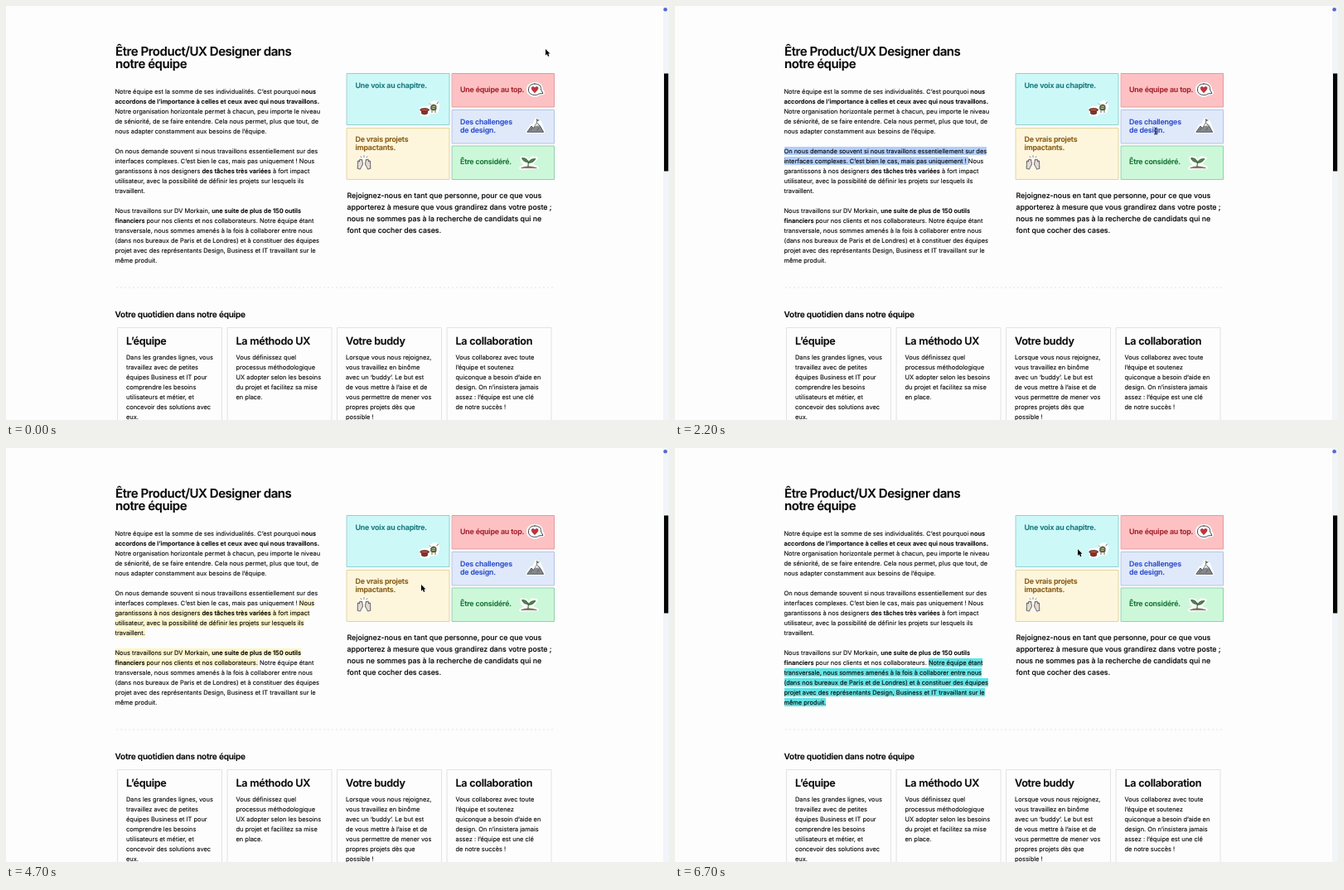
These frames come from a looping animation (800 by 500 pixels, 6800 ms). An HTML page:

```html
<!DOCTYPE html>
<html lang="fr">
<head>
<meta charset="utf-8">
<title>Notre équipe</title>
<style>
html, body { margin: 0; width: 100%; height: 100%; overflow: hidden; background: #fdfdfd; }
#stage { position: relative; width: 800px; height: 500px; overflow: hidden; background: #fdfdfd;
  font: 7.45px/12px Inter, "Liberation Sans", sans-serif; color: #080808;
  font-optical-sizing: none; text-rendering: geometricPrecision;
  -webkit-text-stroke: .12px currentColor; }
svg { position: absolute; left: 0; top: 0; }
.txt { position: absolute; white-space: pre; }
b { font-weight: 600; }
mark { color: inherit; background: none; padding: .5px 0; }
.title { font-size: 15px; line-height: 15px; font-weight: 600; letter-spacing: -.45px; }
.section { font-size: 10px; font-weight: 600; letter-spacing: -.19px; }
.head { font-size: 12.6px; line-height: 14px; font-weight: 600; letter-spacing: -.28px; }
.quote { font-size: 8.78px; line-height: 14px; font-weight: 500; }
.label { font-size: 8.85px; line-height: 10px; font-weight: 600; letter-spacing: -.17px; }
</style>
</head>
<body>
<div id="stage">
<svg width="800" height="500" fill="none" stroke-linecap="round" stroke-linejoin="round">
  <rect x="793" width="7" height="500" fill="#f1f4f8"/>
  <rect x="794" y="81.5" width="5.2" height="118" fill="#050505"/>
  <circle cx="795.6" cy="4.2" r="2.3" fill="#5468cf"/>
  <path d="M133 340H662" stroke="#e3e3e3" stroke-width="1" stroke-linecap="butt" stroke-dasharray="2 3"/>
  <g id="boxes"></g>

  <g id="pot">
    <path d="M500 123.500Q505 121 511 122.500L513 117 516 115.500 521 116 522 121 520 128 511 129.500 509 132 501.500 131.500Z" fill="#fff" stroke="#fff" stroke-width="2.500"/>
    <path d="M501.500 126V130Q505 132 508.500 130V126Z" fill="#84372d" stroke="#4a2520" stroke-width=".7"/>
    <ellipse cx="505" cy="125.500" rx="5.300" ry="1.900" fill="#ad4b3b" stroke="#4a2520" stroke-width=".8"/>
    <path d="M513 120.500Q516 117.500 519 120.500V125Q516 127 513 125Z" fill="#587554" stroke="#2c4030" stroke-width=".8"/>
    <path d="M514 126V128.500M518 126V128.500M520 118L521.500 116M512.500 119L511.500 118" stroke="#665230" stroke-width=".9"/>
    <path d="M515 121.500H517.500M514.500 123.500H517" stroke="#d9c58b" stroke-width=".8"/>
  </g>

  <g id="bubble">
    <path d="M638 94C644 94 646 97 646 101L648 105 643 106C640 109 630 108 630 101 630 96 634 94 638 94Z" fill="#fff" stroke="#fff" stroke-width="4"/>
    <path d="M638 94C644 94 646 97 645.500 101L648 105.500 643 106C640 109 630 108 630.500 101 630.500 96 634 94 638 94Z" fill="#fff" stroke="#353535" stroke-width=".9"/>
    <path d="M638 104.500C633 101 633.500 97.500 636 97.500 637.500 97.500 638 99 638 99S638.700 97.500 640.300 97.500C643 97.500 643 101 638 104.500Z" fill="#c9303d" stroke="#7b1f29" stroke-width=".5"/>
  </g>

  <g id="mountain">
    <path d="M629 152L634 144.500 637 145 640 137 644 140 648.500 152Z" fill="#fff" stroke="#fff" stroke-width="4"/>
    <path d="M629 152L634 145 636.500 147.500 640.500 141 644.500 145 648.500 152Z" fill="#85898d" stroke="#45494d" stroke-width=".9"/>
    <path d="M638 145.500L640.500 141 643.500 145.500 641 144.500Z" fill="#e9edef"/>
    <path d="M633 150L635 147.500M641 150L643 147" stroke="#555a5e" stroke-width=".9"/>
    <path d="M640.500 141V136.500" stroke="#444" stroke-width=".7"/>
    <path d="M640.700 136.500L644 138 640.700 139.500Z" fill="#58825d"/>
  </g>

  <g id="hands">
    <path d="M424 188L430 185 430 195 426 197ZM440 188L434 185 434 195 438 197ZM428 182L432 181 436 182" fill="#fff" stroke="#fff" stroke-width="3"/>
    <path id="hand" transform="rotate(14 427 191)" d="M425.500 196.500L424.500 192 423.500 188Q424.500 186.500 425.500 188.500L425.500 185.500Q426.500 184.500 427.200 186L427.500 185Q429 184.500 429 187L430 189Q431 191 429.500 194L429 196.500Z" fill="#e2dad4" stroke="#4d4844" stroke-width=".8"/>
    <use href="#hand" transform="matrix(-1 0 0 1 864 0)"/>
    <path d="M429 183L428 181.500M432 182.500V180.500M435 183L436 181.500" stroke="#6b6257" stroke-width=".8"/>
  </g>

  <g id="sprout">
    <path d="M622 183L628 184 630 188 635 183 640 184 636 189 632 191 641 195 621 196 628 191 623 188Z" fill="#fff" stroke="#fff" stroke-width="3.500"/>
    <path d="M622 195.500Q630 192 640 195.500Z" fill="#8b7662" stroke="#54483a" stroke-width=".6"/>
    <path d="M630 194Q630.500 190 630 187" stroke="#35643b" stroke-width="1.100"/>
    <path d="M630 188.500Q624 189 622.500 183.500 629 183 630 188.500ZM630.300 189.500Q632 184 639 184.500 636 190 630.300 189.500Z" fill="#52824c" stroke="#2f5a34" stroke-width=".7"/>
  </g>
</svg>

<div class="txt title" style="left:132px;top:47px">Être Product/UX Designer dans
notre équipe</div>

<div class="txt" style="left:131.5px;top:97px"><mark>Notre équipe est la somme de ses individualités. C’est pourquoi <b>nous
accordons de l’importance à celles et ceux avec qui nous travaillons.</b></mark>
<mark>Notre organisation horizontale permet à chacun, peu importe le niveau
de séniorité, de se faire entendre. Cela nous permet, plus que tout, de
nous adapter constamment aux besoins de l’équipe.</mark></div>

<div class="txt" style="left:131.5px;top:169px"><mark>On nous demande souvent si nous travaillons essentiellement sur des
interfaces complexes. C’est bien le cas, mais pas uniquement ! </mark><mark>Nous
garantissons à nos designers <b>des tâches très variées</b> à fort impact
utilisateur, avec la possibilité de définir les projets sur lesquels ils
travaillent.</mark></div>

<div class="txt" style="left:131.5px;top:241px"><mark>Nous travaillons sur DV Morkain, <b>une suite de plus de 150 outils
financiers</b> pour nos clients et nos collaborateurs.</mark> <mark>Notre équipe étant
transversale, nous sommes amenés à la fois à collaborer entre nous
(dans nos bureaux de Paris et de Londres) et à constituer des équipes
projet avec des représentants Design, Business et IT travaillant sur le
même produit.</mark></div>

<div class="txt label" style="left:421.5px;top:91.8px;color:#117579">Une voix au chapitre.</div>
<div class="txt label" style="left:421.5px;top:157px;color:#855811">De vrais projets
impactants.</div>
<div class="txt label" style="left:548px;top:96.5px;color:#a11f2c">Une équipe au top.</div>
<div class="txt label" style="left:548px;top:135.5px;color:#2c4dcc">Des challenges
de design.</div>
<div class="txt label" style="left:548px;top:184px;color:#157335">Être considéré.</div>

<div class="txt quote" style="left:411.5px;top:223.4px">Rejoignez-nous en tant que personne, pour ce que vous
apporterez à mesure que vous grandirez dans votre poste ;
nous ne sommes pas à la recherche de candidats qui ne
font que cocher des cases.</div>

<div class="txt section" style="left:131.5px;top:367px">Votre quotidien dans notre équipe</div>

<div class="txt head" style="left:145px;top:398.5px">L’équipe</div>
<div class="txt" style="left:145px;top:418.5px">Dans les grandes lignes, vous
travaillez avec de petites
équipes Business et IT pour
comprendre les besoins
utilisateurs et métier, et
concevoir des solutions avec
eux.</div>
<div class="txt head" style="left:277.5px;top:398.5px">La méthodo UX</div>
<div class="txt" style="left:277.5px;top:418.5px">Vous définissez quel
processus méthodologique
UX adopter selon les besoins
du projet et facilitez sa mise
en place.</div>
<div class="txt head" style="left:410px;top:398.5px">Votre buddy</div>
<div class="txt" style="left:410px;top:418.5px">Lorsque vous nous rejoignez,
vous travaillez en binôme
avec un ‘buddy’. Le but est
de vous mettre à l’aise et de
vous permettre de mener vos
propres projets dès que
possible !</div>
<div class="txt head" style="left:542.5px;top:398.5px">La collaboration</div>
<div class="txt" style="left:542.5px;top:418.5px">Vous collaborez avec toute
l’équipe et soutenez
quiconque a besoin d’aide en
design. On n’insistera jamais
assez : l’équipe est une clé
de notre succès !</div>

<svg width="800" height="500">
  <g id="cursor">
    <path id="arrow" d="M0 0V7.800L1.800 6.100 3 8.900 4.400 8.300 3.200 5.600H5.500Z" fill="#000" stroke="#fff" stroke-width=".7" paint-order="stroke"/>
    <path id="beam" d="M-1.800-4Q0-4 0-3 0-4 1.800-4M0-3V3M-1.800 4Q0 4 0 3 0 4 1.800 4M-1 1H1" fill="none" stroke="#111" stroke-width=".9"/>
  </g>
</svg>
</div>
<script>
const LOOP = 6800, STEP = 100, FADE = 200;
const $ = id => document.getElementById(id);

function box(x, y, w, h, fill, stroke) {
  const r = document.createElementNS('http://www.w3.org/2000/svg', 'rect');
  Object.entries({ x, y, width: w, height: h, fill, stroke }).forEach(([k, v]) => r.setAttribute(k, v));
  $('boxes').append(r);
}
box(411.5, 81.5, 123.5, 62, '#cdf8f8', '#92cfcf');
box(411.5, 147.5, 123.5, 62, '#fdf6dc', '#e3d3a0');
box(538.5, 81.5, 123, 40.5, '#fdc1c3', '#df9da0');
box(538.5, 125.5, 123, 40.5, '#e0e9f9', '#b1c3e9');
box(538.5, 169, 123, 40.5, '#ccf8d9', '#94cfa9');
for (let i = 0; i < 4; i++) box(135 + i * 132.5, 388.5, 125.5, 130, '#fdfdfd', '#e2e2e2');

// Highlights: colour, time on, time off, passages
const marks = document.querySelectorAll('mark');
const highlights = [
  ['251 176 174', 500, 1600, [0]],
  ['178 206 252', 1700, 2800, [2]],
  ['143 240 170', 2900, 3600, [1]],
  ['253 244 203', 3800, 4900, [3, 4]],
  ['98 228 230', 5300, LOOP, [5]]
];

// Pointer path: time, x, y
const path = [
  [0, 651, 52], [600, 637, 88], [1100, 611, 106], [1600, 592, 125], [2200, 580, 151],
  [2800, 577, 166], [3400, 577, 181], [3700, 560, 183], [4100, 523.5, 179],
  [4700, 501, 165], [5300, 489, 136], [6000, 486, 124], [LOOP, 486, 122]
];
// Label areas that turn the pointer into a text beam: left, top, right, bottom
const labels = [[548, 96, 625, 107], [548, 135, 611, 156], [548, 184, 610, 194]];

const clamp = v => Math.max(0, Math.min(1, v));

function pointer(t) {
  const i = path.findIndex(p => p[0] > t);
  const [a, b] = [path[i - 1], path[i]];
  const k = (t - a[0]) / (b[0] - a[0]);
  return [a[1] + (b[1] - a[1]) * k, a[2] + (b[2] - a[2]) * k];
}

function draw(t) {
  for (const [rgb, on, off, parts] of highlights) {
    const level = clamp((t - on) / FADE) * (1 - clamp((t - off) / FADE));
    for (const p of parts) marks[p].style.background = `rgb(${rgb} / ${level})`;
  }
  const [x, y] = pointer(t);
  const overText = labels.some(([l, top, r, b]) => x > l && x < r && y > top && y < b);
  $('cursor').setAttribute('transform', `translate(${x} ${y})`);
  $('arrow').style.display = overText ? 'none' : '';
  $('beam').style.display = overText ? '' : 'none';
}

const start = performance.now();
function tick() {
  const t = (performance.now() - start) % LOOP;
  draw(Math.floor(t / STEP) * STEP);
  requestAnimationFrame(tick);
}
tick();
</script>
</body>
</html>
```
